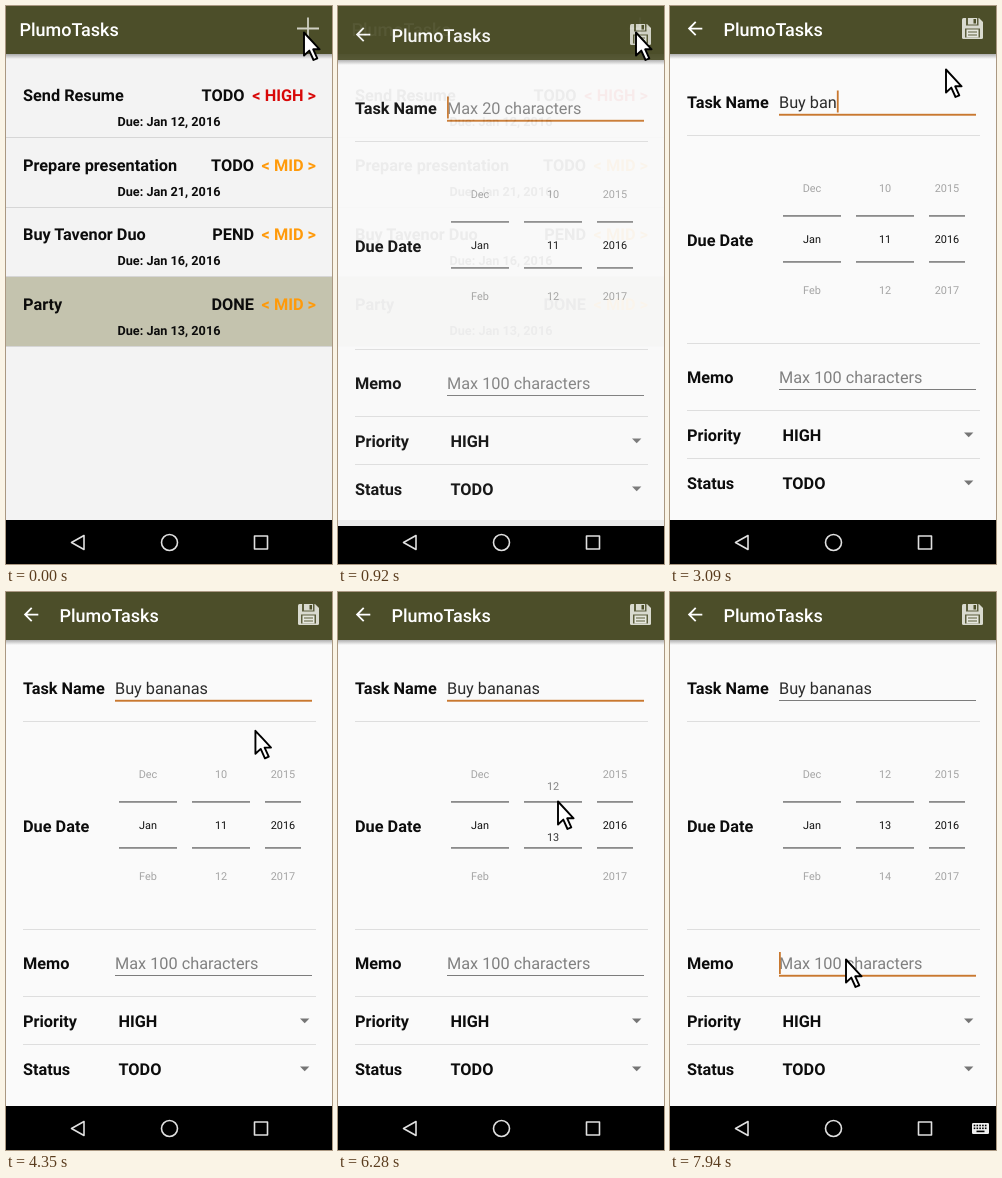
These frames come from a looping animation (326x558 px, 8000 ms). An HTML page:

```html
<!DOCTYPE html>
<html lang="en">
<head>
<meta charset="utf-8">
<title>Task list</title>
<style>
  html, body { margin: 0; width: 100%; height: 100%; overflow: hidden; background: #000; }
  svg { display: block; width: 326px; height: 558px; }
  text { font: 16.3px Roboto, sans-serif; white-space: pre; text-rendering: geometricPrecision; }
  .title { font-size: 18px; font-weight: 500; fill: #fff; }
  .bold { font-weight: 700; fill: #0c0c0c; }
  .due { font-size: 12.68px; }
  .hint { fill: #808080; }
  .input { fill: #2b2b2b; }
  .wheel { font-size: 10.9px; fill: #111; text-anchor: middle; }
  .end { text-anchor: end; }
</style>
</head>
<body>
<svg id="stage" viewBox="0 0 326 558">
  <defs>
    <linearGradient id="shade" x2="0" y2="1">
      <stop offset="0" stop-color="#000" stop-opacity=".3"/>
      <stop offset="1" stop-color="#000" stop-opacity="0"/>
    </linearGradient>
  </defs>
</svg>
<script>
const LOOP = 8000;
const APP = 'PlumoTasks';
const ENTRY = 'Buy bananas';
const ACCENT = '#c9782f';
const GREY = '#7c7c7c';
const stage = document.getElementById('stage');
const $ = id => document.getElementById(id);

const text = (x, y, s, cls = '', more = '') =>
  `<text x="${x}" y="${y}" class="${cls}" ${more}>${s.replace(/</g, '&lt;').replace(/>/g, '&gt;')}</text>`;
const rect = (x, y, w, h, fill, more = '') =>
  `<rect x="${x}" y="${y}" width="${w}" height="${h}" fill="${fill}" ${more}/>`;

const header = x =>
  rect(0, 48, 326, 5, 'url(#shade)') + rect(0, 0, 326, 48, '#4c4e29') + text(x, 29.5, APP, 'title');

function listPage() {
  const rows = [
    ['Send Resume', 'TODO', 'HIGH', '12'],
    ['Prepare presentation', 'TODO', 'MID', '21'],
    ['Buy Tavenor Duo', 'PEND', 'MID', '16'],
    ['Party', 'DONE', 'MID', '13'],
  ];
  const row = ([name, status, level, day], i) => {
    const y = 62 + i * 69.6;
    const high = level === 'HIGH';
    return (status === 'DONE' ? rect(0, 271, 326, 69, '#c4c3ae') : '') +
      rect(0, Math.round(y + 69), 326, 1, '#d6d6d6') +
      text(17, y + 33, name, 'bold') +
      text(high ? 238.5 : 248, y + 33, status, 'bold end') +
      text(310, y + 33, `< ${level} >`, 'bold end', `style="fill:${high ? '#d80808' : '#ff9a0a'}"`) +
      text(111.5, y + 58, `Due: Jan ${day}, 2016`, 'bold due');
  };
  return rect(0, 0, 326, 514, '#f3f3f3') + rows.map(row).join('') + header(13.5) +
    '<circle id="ripple" cx="301.5" cy="23" r="13" fill="#fff" opacity=".09"/>' +
    '<path d="M302 11.5V33.5M291 22.5H313" stroke="#cfd0c3" stroke-width="1.8"/>';
}

const fade = dy => Math.max(0, 1 - Math.abs(dy) / 80).toFixed(3);
const wheelItem = (x, dy, s) => text(x, 237.4 + dy, s, 'wheel', `opacity="${fade(dy)}"`);
const wheel = (x, items) => items.map((s, i) => wheelItem(x, (i - 1) * 51, s)).join('');

const saveIcon =
  '<path d="M293.5 12H309L313 16V31.500Q313 33 311.500 33H293.500Q292 33 292 31.500V13.500Q292 12 293.500 12Z" fill="#d9dacf"/>' +
  rect(296, 12, 12.5, 7.5, '#5c5e3c') + rect(298, 12, 9, 6.5, '#d9dacf') + rect(303.5, 13, 2.5, 4.5, '#4c4e29') +
  rect(295, 22.5, 15, 9, '#5c5e3c') + rect(296.5, 23.5, 12, 8, '#e6e7de') +
  rect(298, 25.5, 9, 1, '#5c5e3c') + rect(298, 28.5, 9, 1, '#5c5e3c');

function formPage() {
  const labels = [['Task Name', 102], ['Due Date', 239.5], ['Memo', 377], ['Priority', 435], ['Status', 483]];
  const spinner = (y, s) => text(112.5, y, s, 'bold') +
    `<path d="M294 ${y - 8.5}h9.400l-4.700 4.700z" fill="#757575"/>`;
  const columns = [[113, 58], [186, 58], [259, 36]];
  return rect(0, 0, 326, 514, '#fafafa') + header(53.5) +
    '<path transform="translate(14.2 11.700) scale(.9056)" fill="#fff" d="M20 11H7.830l5.590-5.590L12 4l-8 8 8 8 1.410-1.410L7.830 13H20z"/>' +
    saveIcon +
    labels.map(([s, y]) => text(17, y, s, 'bold')).join('') +
    [129, 337, 404, 452].map(y => rect(17, y, 293, 1, '#dedede')).join('') +
    columns.map(([x, w]) => rect(x, 209, w, 1.8, '#8b8b8b') + rect(x, 255, w, 1.8, '#8b8b8b')).join('') +
    wheel(142, ['Dec', 'Jan', 'Feb']) + wheel(277, ['2015', '2016', '2017']) + '<g id="days"></g>' +
    text(109, 102, '', '', 'id="task"') + text(109, 377, 'Max 100 characters', 'hint') +
    '<rect id="taskLine" x="109" width="197"/><rect id="memoLine" x="109" width="197"/>' +
    `<rect id="caret" width="1.800" height="22" fill="${ACCENT}"/>` +
    spinner(435, 'HIGH') + spinner(483, 'TODO');
}

function navBar() {
  const keys = [0, 1, 2, 3, 4].map(i =>
    rect(303.7 + i * 2.8, 532.7, 1.6, 1.6, '#000') + rect(303.7 + i * 2.8, 535.5, 1.6, 1.6, '#000')).join('');
  return rect(0, 514, 326, 44, '#000') +
    '<g fill="none" stroke="#e0e0e0" stroke-width="1.600" stroke-linejoin="round">' +
    '<path d="M65.500 536.500L78 529.500V543.500Z"/><circle cx="163.500" cy="536.500" r="8"/>' +
    '<path d="M248.500 530H261.500V543H248.500Z"/></g>' +
    '<g id="keyboard">' + rect(302, 531, 17, 11, '#f0f0f0', 'rx="1.2"') + keys +
    rect(306.5, 538.6, 8, 1.6, '#000') + '</g>';
}

stage.insertAdjacentHTML('beforeend',
  `<g id="list">${listPage()}</g>${navBar()}<g id="form">${formPage()}</g>` +
  '<path id="pointer" d="M1 1.500V24.500L6.300 19.600L10.500 29L14.300 27.300L10.200 18.300H16.600Z" ' +
  'fill="#fff" stroke="#000" stroke-width="1.900" stroke-linejoin="round"/>');

const updates = [
  [0, 0, 1], [380, 380, 1], [650, 650, 1], [920, 1430, 5], [1840, 1840, 1], [2110, 2380, 3],
  [2660, 2660, 1], [2940, 3630, 6], [4080, 5070, 8], [5190, 6150, 8], [6280, 7250, 8], [7370, 7940, 5],
];

function held(t) {
  const [start, end, count] = updates.filter(u => u[0] <= t).pop();
  if (count === 1) return start;
  const step = (end - start) / (count - 1);
  return start + step * Math.min(count - 1, Math.floor((t - start + .5) / step));
}

// Interpolates keys of the form [time, value, ...]
function track(keys, t) {
  const i = keys.findIndex(k => k[0] > t);
  if (i === 0) return keys[0].slice(1);
  if (i < 0) return keys[keys.length - 1].slice(1);
  const a = keys[i - 1], b = keys[i];
  const p = (t - a[0]) / (b[0] - a[0]);
  return a.slice(1).map((v, j) => v + (b[j + 1] - v) * p);
}

const pointerKeys = [
  [1000, 297, 25], [1400, 275, 62], [4000, 275, 62], [4350, 233, 181], [4640, 219, 257], [4780, 219, 258],
  [5190, 219, 208], [5330, 219, 208], [5740, 219, 259], [5870, 219, 258], [6280, 219, 208],
  [6560, 219, 208], [7250, 177, 353], [7370, 175, 366],
];
const scrollKeys = [
  [4860, 0], [5190, 39.5], [5330, 47], [5470, 51], [5950, 51], [6280, 90.5], [6420, 98], [6560, 102],
];
const enterKeys = [[920, 6, .94], [1047, 1.5, 1], [1175, 0, 1]];

function typedCount(t) {
  if (t < 2110) return 0;
  if (t < 2660) return 1 + Math.round((t - 2110) / 135);
  if (t < 2940) return 4;
  return Math.min(ENTRY.length, 6 + Math.round((t - 2940) / 138));
}

function underline(id, y, focused) {
  const el = $(id);
  el.setAttribute('y', focused ? y - .2 : y);
  el.setAttribute('height', focused ? 1.9 : 1);
  el.setAttribute('fill', focused ? ACCENT : GREY);
}

function drawForm(t) {
  const [dy, alpha] = track(enterKeys, t);
  $('form').setAttribute('transform', `translate(0 ${dy})`);
  $('form').setAttribute('opacity', alpha);

  const count = typedCount(t);
  const task = $('task');
  task.textContent = count ? ENTRY.slice(0, count) : 'Max 20 characters';
  task.setAttribute('class', count ? 'input' : 'hint');

  const inMemo = t >= 7500;
  underline('taskLine', 108, !inMemo);
  underline('memoLine', 383, inMemo);

  const blinkOff = (t >= 1430 && t < 1840) || (t > 3630 && (t - 3580) % 1000 >= 500);
  const caret = $('caret');
  caret.setAttribute('visibility', inMemo || !blinkOff ? 'visible' : 'hidden');
  caret.setAttribute('x', 109 + (count && !inMemo ? task.getComputedTextLength() : 0));
  caret.setAttribute('y', inMemo ? 360 : 84.5);

  const [scroll] = track(scrollKeys, t);
  const turn = Math.floor((scroll + 7) / 51);
  $('days').innerHTML = [-1, 0, 1]
    .map(i => wheelItem(215, (turn + i) * 51 - scroll, String(11 + turn + i))).join('');
}

const show = (id, on) => { $(id).style.display = on ? '' : 'none'; };

function render(time) {
  const t = held(time);
  show('list', t < 1300);
  show('ripple', t >= 380 && t < 650);
  show('form', t >= 920);
  show('keyboard', t >= 7790);
  if (t >= 920) drawForm(t);
  $('pointer').setAttribute('transform', `translate(${track(pointerKeys, t).join(' ')})`);
}

const begin = performance.now();
function tick() {
  render((performance.now() - begin) % LOOP);
  requestAnimationFrame(tick);
}
tick();
</script>
</body>
</html>
```
